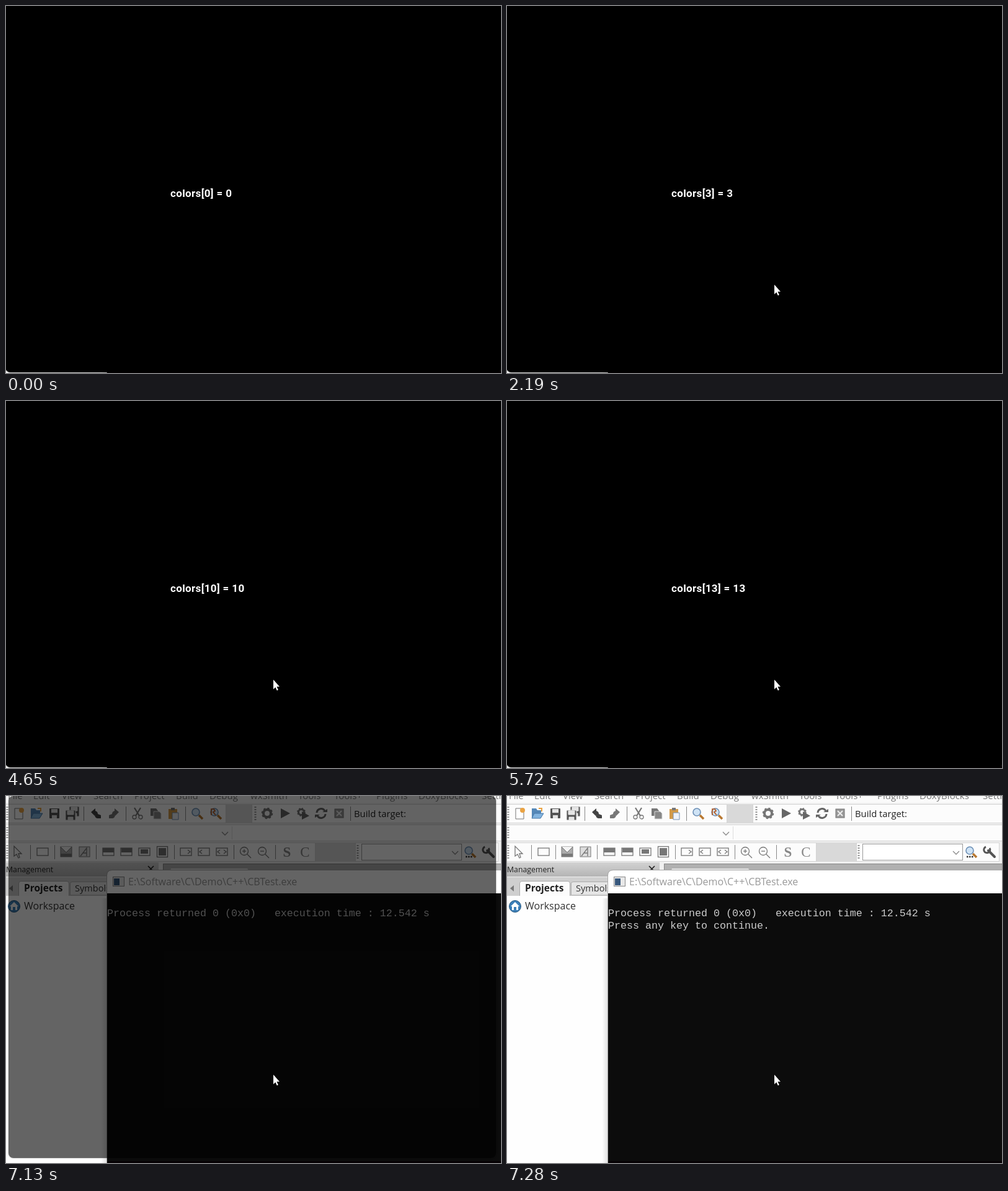
An HTML page that plays this animation: 798x592 px, repeating every 7.61 s.

```html
<!DOCTYPE html>
<html lang="en">
<head>
<meta charset="utf-8">
<title>Colour counter</title>
<style>
  :root { --loop: 7610ms step-end infinite; }
  html, body { margin: 0; width: 100%; height: 100%; overflow: hidden; background: #f0f0f0; }
  svg { position: absolute; left: 0; top: 0; }
  text { font-family: "Open Sans", "Noto Sans", sans-serif; white-space: pre; }
  .menu text { font-size: 15px; fill: #777; }
  .bar { fill: #fcfcfc; stroke: #d4d4d4; }
  .gap { fill: #d9d9d9; }
  .sep { stroke: #888; fill: none; }
  .grip { stroke: #999; stroke-width: 3; stroke-dasharray: 2 2; }
  .line { fill: none; stroke: #777; stroke-width: 1.3; }
  .grey { fill: #777; }
  .dark { fill: #444; }
  .shell text { font: 16.67px "Liberation Mono", monospace; fill: #ccc; }

  #veil {
    position: absolute; left: -1px; top: -10px; width: 799px; height: 601px;
    border-radius: 8px; background: #000; box-shadow: 0 0 3px rgba(0, 0, 0, .4);
    animation: close var(--loop);
  }
  #label {
    position: absolute; left: 265px; top: 292px; line-height: 20px; white-space: pre;
    font-family: Roboto, Arial, sans-serif; font-size: 17px; font-weight: bold;
    letter-spacing: .35px; color: #fff;
  }
  #ring { animation: press var(--loop); }
  #pointer { animation: approach var(--loop); }
  #prompt { animation: prompt var(--loop); }

  @keyframes close {
    0% { opacity: 1; }
    93.69% { opacity: .61; left: 4px; top: 0; width: 786px; height: 584px; }
    94.74% { opacity: .2; left: 14px; top: 12px; width: 760px; height: 561px; }
    95.66%, 100% { opacity: 0; }
  }
  @keyframes approach {
    0% { opacity: 0; transform: translate(195px, 76px); }
    2.89% { opacity: 1; transform: translate(195px, 76px); }
    3.94% { opacity: 1; transform: translate(110px, 43px); }
    4.99% { opacity: 1; transform: translate(30px, 12px); }
    6.04%, 100% { opacity: 1; transform: none; }
  }
  @keyframes press {
    0% { opacity: 0; }
    9.33% { opacity: .47; }
    11.3%, 100% { opacity: 0; }
  }
  @keyframes prompt {
    0% { opacity: 0; }
    94.74%, 100% { opacity: 1; }
  }
</style>
</head>
<body>
<svg width="798" height="592" viewBox="0 0 798 592">
  <defs>
    <linearGradient id="caption" x2="0" y2="1"><stop stop-color="#d2d2d2"/><stop offset="1" stop-color="#b4b4b4"/></linearGradient>
    <linearGradient id="shade"><stop stop-color="#fff"/><stop offset="1" stop-color="#dedede"/></linearGradient>
    <g id="lens"><path d="M3 3 9 9" stroke="#b87830" stroke-width="3.5"/><circle cx="-2" cy="-2" r="6" fill="#cfe3f5" stroke="#6c8fb5" stroke-width="1.6"/></g>
    <g id="zoom"><path class="line" d="M3 3 9 9" stroke-width="2"/><circle class="line" cx="-2" cy="-2" r="6.5"/><path class="line" d="M-5-2H1"/></g>
    <g id="disk"><rect x="-8" y="-8" width="16" height="16" rx="1" fill="#555"/><path d="M-5-7H5V-1H-5ZM-4 3H4V8H-4Z" fill="#e4e4e4"/></g>
    <g id="gear"><circle r="6" fill="none" stroke="#777" stroke-width="4"/><circle r="8" fill="none" stroke="#777" stroke-width="2.5" stroke-dasharray="3.1 3.2"/></g>
    <path id="curl" d="M-8-2-1-8V-4Q3-3 3 1L8 3V8H2Q-2 7-2 2L-2 4Z"/>
    <rect id="frame" class="line" x="-9" y="-6" width="18" height="12"/>
    <path id="chevron" d="M-5-2 0 3 5-2" fill="none" stroke="#888" stroke-width="1.3"/>
  </defs>

  <rect width="798" height="592" fill="#f0f0f0"/>
  <rect width="798" height="11" fill="#fafafa"/>
  <g class="menu">
    <text x="3" y="5">File</text><text x="44" y="5">Edit</text><text x="90" y="5">View</text>
    <text x="141" y="5">Search</text><text x="207" y="5">Project</text><text x="274" y="5">Build</text>
    <text x="328" y="5">Debug</text><text x="394" y="5">wxSmith</text><text x="471" y="5">Tools</text>
    <text x="529" y="5">Tools+</text><text x="597" y="5">Plugins</text><text x="665" y="5">DoxyBlocks</text>
    <text x="767" y="5">Settings</text>
  </g>

  <!-- toolbar rows -->
  <rect class="gap" x="354" y="13" width="43" height="31"/>
  <rect class="gap" x="499" y="75" width="64" height="31"/>
  <rect class="bar" x="-1.5" y="13.5" width="356" height="30"/>
  <rect class="bar" x="396.5" y="13.5" width="403" height="30"/>
  <rect class="bar" x="-1.5" y="46.5" width="801" height="26"/>
  <rect class="bar" x="-1.5" y="75.5" width="500" height="30"/>
  <rect class="bar" x="563.5" y="75.5" width="230" height="30"/>
  <path class="grip" d="M2 17V41M402 17V41M2 50V70M2 79V103M567 79V103"/>
  <path class="sep" d="M125.5 17V40M193.5 17V40M289.5 17V40M555.5 17V40M39.5 79V102M78.5 79V102M145.5 79V102M271.5 79V102M367.5 79V102M434.5 79V102"/>
  <path d="M364.5 49V70" stroke="#ddd"/>
  <use href="#chevron" x="353" y="60"/>

  <g transform="translate(20 28)"><path d="M-6-8H3L7-4V9H-6Z" fill="#fff" stroke="#777"/><circle cx="5" cy="-5" r="4" fill="#eaa343"/></g>
  <g transform="translate(49 28)"><path d="M-9-8H-2L0-5H6V7H-9Z" fill="#5588b8"/><path d="M-5 0H10L5 8H-9Z" fill="#83b4df" stroke="#4678a8"/><path d="M2-8H7V-3" fill="none" stroke="#eaa343" stroke-width="2"/></g>
  <use href="#disk" x="78" y="28"/>
  <g stroke="#eee"><use href="#disk" x="110" y="25"/><use href="#disk" x="104" y="31"/></g>
  <use href="#curl" x="145" y="28" class="dark"/>
  <use href="#curl" transform="translate(174 28) scale(-1 1)" class="grey"/>
  <g transform="translate(212 28)" class="line"><path d="M-5-9 3 4M5-9-3 4" stroke-width="2.2"/><circle cx="-5" cy="6" r="3"/><circle cx="5" cy="6" r="3"/></g>
  <path class="grey" d="M233 20H242L245 24V32H233Z"/><path d="M238 25H247L250 28V37H238Z" fill="#888" stroke="#ddd"/>
  <g transform="translate(270 28)"><rect x="-8" y="-7" width="14" height="16" fill="#d29a48"/><rect x="-4" y="-9" width="6" height="4" fill="#777"/><path d="M-2-1H8V10H-2Z" fill="#eef2f8" stroke="#7792b3"/></g>
  <use href="#lens" x="308" y="28"/>
  <use href="#lens" x="338" y="28"/><path d="M331 31V21H335L337 24 334 26 338 31" fill="none" stroke="#b55b24" stroke-width="1.7"/>
  <use href="#gear" x="421" y="28"/>
  <path d="M443 20 458 28 443 36Z" fill="#666"/>
  <use href="#gear" transform="translate(476 26) scale(.75)"/><path d="M477 25 489 32 477 38Z" fill="#666"/>
  <g transform="translate(508 28)"><path d="M-7-1A7 7 0 0 1 6-4M7 1A7 7 0 0 1-6 4" fill="none" stroke="#666" stroke-width="3"/><path d="M2-2H10V-7ZM-2 2H-10V7Z" fill="#666"/></g>
  <rect x="530" y="21" width="14" height="14" fill="#999" stroke="#777"/><path d="M533 24 541 32M541 24 533 32" stroke="#eee" stroke-width="2"/>
  <text x="561" y="34" font-size="14.8" fill="#222">Build target:</text>

  <path class="line" d="M13 81V97L17 94 20 100 22 99 20 93H25Z"/>
  <use href="#frame" x="59" y="90"/>
  <g transform="translate(97 90)"><rect x="-9" y="-8" width="18" height="16" fill="#aaa" stroke="#777"/><path d="M-9-8 0 1 9-8" fill="#f4f4f4" stroke="#777"/><rect x="-9" y="3" width="18" height="5" class="grey"/></g>
  <g transform="translate(126 90)"><rect x="-8" y="-8" width="17" height="16" fill="#ddd" stroke="#777"/><path class="line" d="M-6 7 4-6V7M-2 2H4" stroke-width="2"/></g>
  <use href="#frame" x="165" y="90"/><rect x="156" y="84" width="18" height="7" class="grey"/>
  <use href="#frame" x="194" y="90"/><rect x="186" y="84" width="17" height="7" class="grey"/>
  <use href="#frame" x="223" y="90"/><rect x="217" y="86" width="12" height="7" class="grey"/>
  <rect class="line" x="243.5" y="81.5" width="17" height="17"/><rect x="246" y="84" width="12" height="12" class="grey"/>
  <use href="#frame" x="290" y="90"/><path class="line" d="M293 87 297 90 293 93"/>
  <use href="#frame" x="319" y="90"/><path class="line" d="M316 87 312 90 316 93"/>
  <use href="#frame" x="348" y="90"/><path class="line" d="M345 87 341 90 345 93M351 87 355 90 351 93"/>
  <use href="#zoom" x="386" y="91"/><path class="line" d="M384 86V92"/>
  <use href="#zoom" x="415" y="91"/>
  <g style="font-size:23px;font-weight:bold" fill="#888" text-anchor="middle">
    <text x="453" y="98" style="font-family:'Liberation Serif',serif">S</text>
    <text x="482" y="98" style="font-family:'Liberation Serif',serif;font-weight:normal">C</text>
  </g>
  <rect x="573.5" y="77.5" width="161" height="26" fill="#fff" stroke="#999"/>
  <use href="#chevron" x="724" y="91"/>
  <use href="#lens" x="748" y="90"/><path d="M741 98H752" stroke="#333" stroke-width="2.5" stroke-dasharray="2.5 1.5"/>
  <path d="M776 88 786 98" stroke="#555" stroke-width="4" stroke-linecap="round"/><path d="M772 82A5 5 0 1 0 778 84" fill="none" stroke="#555" stroke-width="3"/>

  <!-- side panel -->
  <rect y="107" width="246" height="23" fill="url(#caption)"/>
  <text x="0" y="123" font-size="12.3" fill="#222">Management</text>
  <path d="M229 113 238 122M238 113 229 122" stroke="#222" stroke-width="1.7"/>
  <rect x="253" y="109" width="545" height="20" fill="#b0b0b0"/>
  <path d="M253.5 130V109.5H798" class="sep"/>
  <path d="M263 125 266 117H389L392 121V125Z" fill="#e6e6e6"/>
  <rect y="131" width="246" height="30" fill="#cfcfcf"/>
  <path d="M11 144V154L5 149Z" class="grey"/>
  <path d="M20.5 161V141Q20.5 137.5 24 137.5H98Q101.5 137.5 101.5 141V161" fill="#fcfcfc" stroke="#aaa"/>
  <path d="M103.5 160V141Q103.5 138.5 107 138.5H170V160Z" fill="#e5e5e5" stroke="#aaa"/>
  <text x="29" y="154" font-size="15.5" font-weight="bold" fill="#222">Projects</text>
  <text x="111" y="154" font-size="14.5" fill="#333">Symbols</text>
  <rect y="161" width="246" height="431" fill="#fefefe"/>
  <rect x="153" y="165" width="10" height="427" fill="url(#shade)"/>
  <circle cx="13" cy="178" r="9.5" fill="#3c7fb8" stroke="#28587f"/>
  <path d="M6 178 13 171 20 178H18V184H15V179H11V184H8V178Z" fill="#fff"/>
  <text x="29" y="183" font-size="16" fill="#333">Workspace</text>

  <!-- console window -->
  <path d="M163 157V128Q163 120 171 120H798V157Z" fill="#fff"/>
  <path d="M162.5 592V128Q162.5 119.5 171 119.5H798" fill="none" stroke="#a8a8a8"/>
  <rect x="172.5" y="130.5" width="18" height="15" fill="#e8e8e8" stroke="#888"/><rect x="174" y="133" width="9" height="11" fill="#37577c"/>
  <text x="197" y="144" font-size="16" fill="#999">E:\Software\C\Demo\C++\CBTest.exe</text>
  <rect x="163" y="157" width="635" height="435" fill="#0c0c0c"/>
  <rect x="163" y="589" width="635" height="3" fill="#050003"/>
  <g class="shell">
    <text x="163" y="194">Process returned 0 (0x0)   execution time : 12.542 s</text>
    <text x="163" y="214" id="prompt">Press any key to continue.</text>
  </g>
</svg>

<div id="veil"></div>
<div id="label"></div>

<svg width="798" height="592" viewBox="0 0 798 592">
  <circle id="ring" cx="430" cy="448" r="15" fill="#ff0"/>
  <path id="pointer" d="M431 449.5V465L434.3 461.8 436.8 466.9 438.9 465.9 436.5 460.7H441Z" fill="#fff" stroke="#000" paint-order="stroke"/>
</svg>

<script>
  const LOOP = 7610;
  const CLEARED = 6800;
  const steps = [1530, 1860, 2190, 2530, 2920, 3260, 3650, 3980, 4310, 4650, 5040, 5390, 5720, 6070, 6410];
  const label = document.getElementById("label");
  let start;

  function draw(now) {
    start ??= now;
    const time = (now - start) % LOOP;
    const count = steps.filter(step => step <= time).length;
    label.textContent = time < CLEARED ? `colors[${count}] = ${count}` : "";
    requestAnimationFrame(draw);
  }
  requestAnimationFrame(draw);
</script>
</body>
</html>
```
